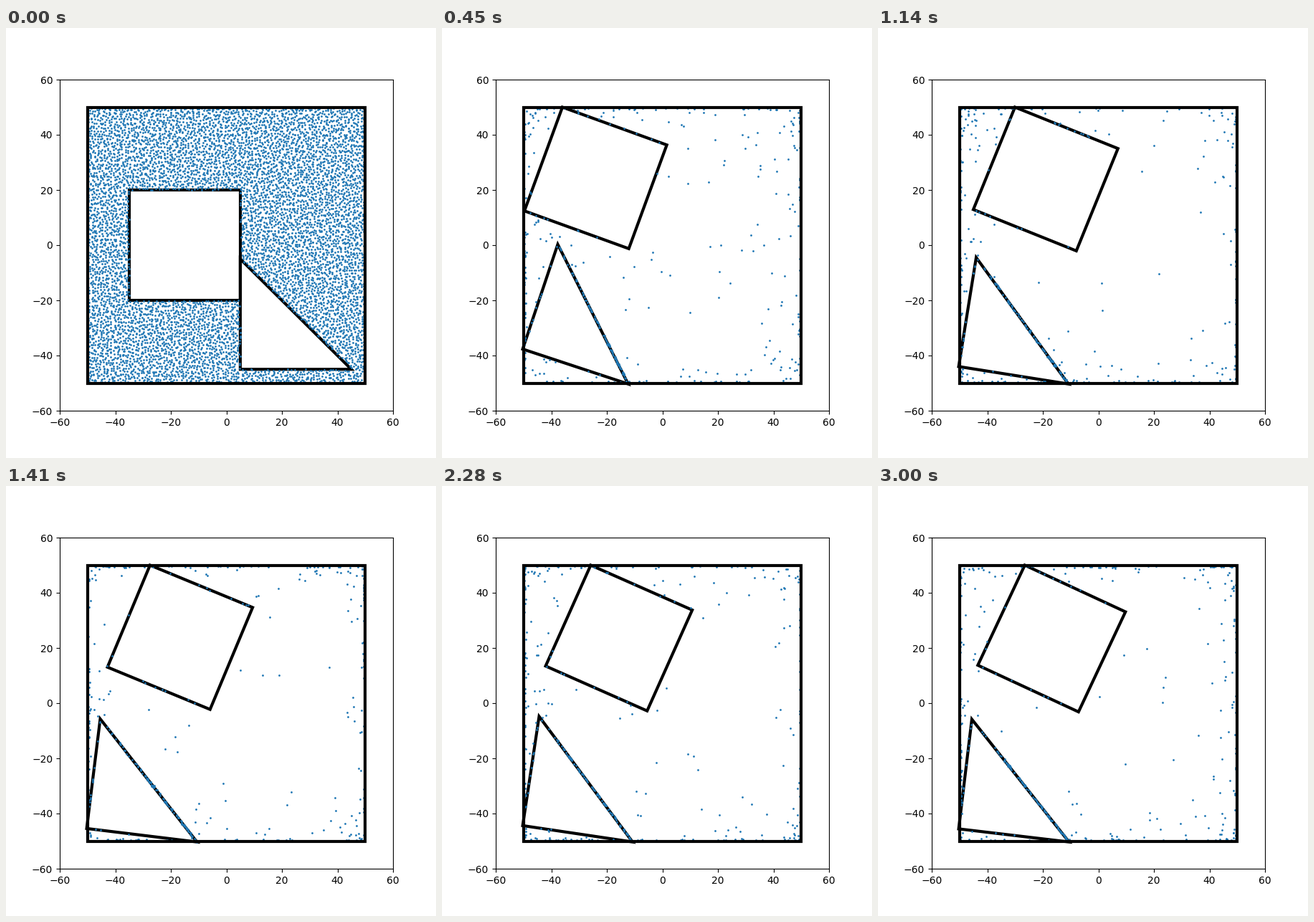
A matplotlib script that plays this animation: 600x600 px, repeating every 3030 ms.

```python
import numpy as np
import matplotlib.pyplot as plt
from matplotlib.animation import FuncAnimation
from matplotlib.patches import Polygon

FRAMES, STEP_MS = 101, 30
HALF, SIDE = 50, 40
LAND = 12         # frame at which both bodies reach the walls
SINK = 0.3        # how far the wedge presses into the walls
LIFE = 8          # frames a gas particle is followed
DECAY = 3.0       # mean survival of the initial cloud, in frames

# After landing, the box slides along the top and the wedge rocks
TIMES = [15, 30, 47, 60, 76, 100]
BOX_X = [-36, -32.3, -27.5, -26.3, -25.8, -26.5]
WEDGE_TILT = [18.4, 10.9, 7, 8.6, 8.5, 6.8]


def lerp(a, b, u):
    return a + (b - a) * u


def place(x, y, tilt, corners):
    a = np.radians(tilt)
    turn = np.array([[np.cos(a), -np.sin(a)], [np.sin(a), np.cos(a)]])
    return np.array([x, y]) + SIDE * np.array(corners) @ turn


def box_at(k):
    u = min(k / LAND, 1)
    late = max(k - 15, 0) / 85
    x = lerp(-35, np.interp(k, TIMES, BOX_X), u)
    y = lerp(20, HALF, u ** 0.7)
    tilt = 20 * u + 5 * late ** 0.7
    return place(x, y, tilt, [(0, 0), (0, -1), (1, -1), (1, 0)])


def wedge_at(k):
    u = min(k / LAND, 1)
    rest = HALF + SINK
    tilt = np.interp(k, TIMES, WEDGE_TILT) * u ** 3
    x = lerp(5, -rest, u ** 2)
    floor = lerp(-45, -rest, min(2 * u, 1))
    y = floor + SIDE * np.sin(np.radians(tilt))
    return place(x, y, tilt, [(0, 0), (1, 0), (0, 1)])


def inside(pts, poly):
    """True for points within a counter-clockwise convex polygon."""
    hit = np.ones(len(pts), bool)
    for a, b in zip(poly, np.roll(poly, -1, axis=0)):
        d, r = b - a, pts - a
        hit &= d[0] * r[:, 1] - d[1] * r[:, 0] > 0
    return hit


def outside(pts, polys):
    for poly in polys:
        pts = pts[~inside(pts, poly)]
    return pts


def bounce(pts, lim=HALF - 0.5):
    """Fold straight flights back between the walls."""
    return np.abs((pts - lim) % (4 * lim) - 2 * lim) - lim


def along_walls(rng, n, depth):
    s = rng.uniform(-HALF, HALF, n)
    d = HALF - 0.4 - rng.exponential(depth, n)
    pts = np.column_stack([s, d * rng.choice([-1, 1], n)])
    flip = rng.random(n) < 0.5
    pts[flip] = pts[flip][:, ::-1]
    return pts


def near_corners(rng, n):
    off = HALF - 0.5 - rng.exponential(5, (n, 2))
    return off * rng.choice([-1, 1], (n, 2))


def on_edge(rng, a, b, n, power=1.0):
    t = rng.random((n, 1)) ** power
    return lerp(a, b, t) + rng.normal(0, 0.15, (n, 2))


# One particle per unit cell, jittered
rng0 = np.random.default_rng(7)
cells = np.stack(np.meshgrid(*[np.arange(-HALF, HALF)] * 2), -1).reshape(-1, 2)
start = outside(cells + rng0.random(cells.shape), [box_at(0), wedge_at(0)])
speed = rng0.normal(0, 1.5, start.shape)
death = rng0.exponential(DECAY, len(start))


def gas(k):
    """Thin steady gas: groups of particles renewed in turn."""
    groups = []
    for g in range(LIFE):
        cycle, age = divmod(k + g, LIFE)
        rng = np.random.default_rng([g, cycle, 3])
        wall = along_walls(rng, 14, 0.15)
        loose = np.vstack([along_walls(rng, 10, 4.5), near_corners(rng, 5),
                           rng.uniform(-HALF, HALF, (4, 2))])
        drift = rng.normal(0, 0.8, loose.shape) * (age - LIFE / 2)
        groups += [wall, bounce(loose + drift)]
    return np.vstack(groups)


def contacts(k, box, wedge):
    """Particles pressed against the bodies or caught between them."""
    rng = np.random.default_rng([k, 11])
    tl, bl, br, tr = box
    corner, tip, apex = wedge
    gap = apex + rng.normal((-5, 4), (4, 3), (9, 2))
    return np.vstack([
        on_edge(rng, apex, tip, 110, 0.65), on_edge(rng, apex, corner, 11),
        on_edge(rng, corner, tip, 3), on_edge(rng, tl, tr, 8, 1.5),
        on_edge(rng, bl, br, 7), on_edge(rng, tl, bl, 2),
        outside(gap[np.abs(gap).max(axis=1) < HALF - 0.4], [box, wedge])])


def particles(k, box, wedge):
    if k == 0:
        return start
    live = death > k
    flying = np.vstack([bounce(start[live] + speed[live] * k), gas(k)])
    return np.vstack([outside(flying, [box, wedge]), contacts(k, box, wedge)])


fig, ax = plt.subplots(figsize=(6, 6), dpi=100)
ax.set_xlim(-60, 60)
ax.set_ylim(-60, 60)

outline = dict(fill=False, ec="black", lw=3)
box_patch = ax.add_patch(Polygon(box_at(0), zorder=1, **outline))
wedge_patch = ax.add_patch(Polygon(wedge_at(0), zorder=1, **outline))
dots, = ax.plot([], [], "o", ms=1, color="tab:blue", zorder=2)
walls = HALF * np.array([(-1, -1), (1, -1), (1, 1), (-1, 1)])
ax.add_patch(Polygon(walls, zorder=3, **outline))


def draw(k):
    box, wedge = box_at(k), wedge_at(k)
    box_patch.set_xy(box)
    wedge_patch.set_xy(wedge)
    dots.set_data(*particles(k, box, wedge).T)
    return box_patch, wedge_patch, dots


anim = FuncAnimation(fig, draw, frames=FRAMES, interval=STEP_MS,
                     repeat=True, repeat_delay=0)
plt.show()
```
